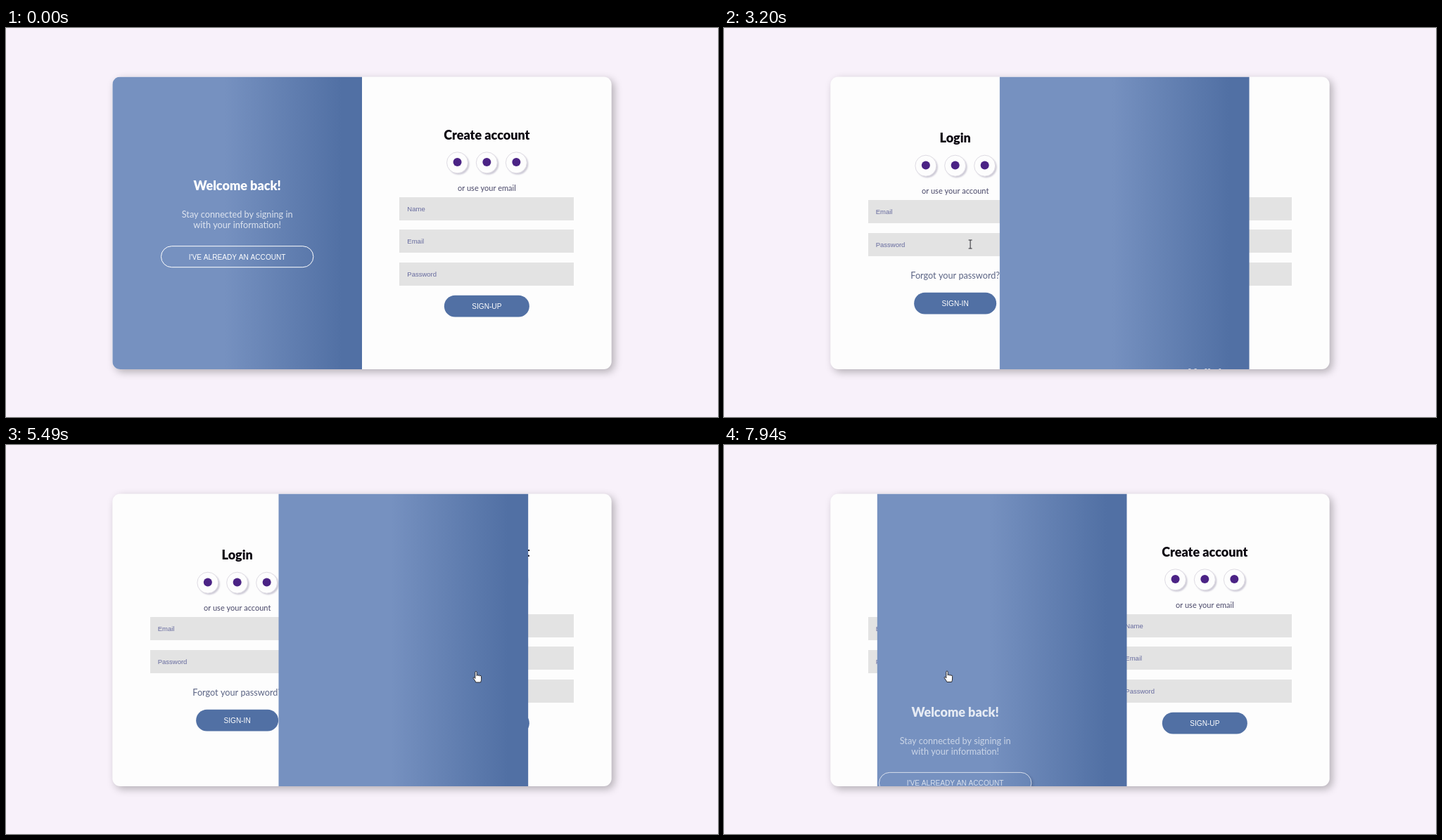
Write an HTML page with a canvas that moves like this. It is 1012 px wide and 554 px high and loops after 8 s.

```html
<!DOCTYPE html>
<html lang="en">
<head>
<meta charset="utf-8">
<title>Sliding sign-in card</title>
<style>
  html, body { margin: 0; width: 100%; height: 100%; overflow: hidden; background: #f8f1fa; }
  canvas { display: block; }
</style>
</head>
<body>
<canvas id="stage" width="1012" height="554"></canvas>
<script>
const ctx = document.getElementById('stage').getContext('2d');
const LOOP = 8000;
const CARD = { x: 151.3, y: 69.6, w: 709.4, h: 416.4, r: 11 };
const HALF = CARD.w / 2;
const LEFT = CARD.x + HALF / 2, RIGHT = LEFT + HALF;
const WHITE = '#fdfdfd', BLUE = '#5170a4', LIGHT = '#7691c0';
const HUMAN = 'Lato, "Open Sans", sans-serif';
const ARIAL = '"Liberation Sans", Arial, sans-serif';
const TITLE = `900 18px ${HUMAN}`, BODY = `12.7px ${HUMAN}`, SMALL = `11px ${HUMAN}`;
const BUTTON = `10.1px ${ARIAL}`, FIELD = `9.5px ${ARIAL}`;

const clamp = v => Math.min(1, Math.max(0, v));

// cubic-bezier(.25, .1, .25, 1)
function ease(x) {
  if (x <= 0 || x >= 1) return clamp(x);
  const curve = (a, b, s) => 3 * (1 - s) * (1 - s) * s * a + 3 * (1 - s) * s * s * b + s * s * s;
  let lo = 0, hi = 1;
  for (let i = 0; i < 24; i++) {
    const mid = (lo + hi) / 2;
    if (curve(.25, .25, mid) < x) lo = mid; else hi = mid;
  }
  return curve(.1, 1, lo);
}

// 0: panel on the left, 1: panel on the right
const slide = t => ease((t - 2804) / 1000) - ease((t - 5274) / 1000) + ease((t - 7790) / 1000);

const hover = (t, from, to) => clamp((t - from) / 400) * (1 - clamp((t - to) / 400));

function box(x, y, w, h, r) {
  ctx.beginPath();
  ctx.roundRect(x, y, w, h, r);
}

function text(str, x, y, font, color, align = 'center') {
  ctx.font = font;
  ctx.fillStyle = color;
  ctx.textAlign = align;
  ctx.fillText(str, x, y);
}

function shadow(color, offset, blur) {
  ctx.shadowColor = color;
  ctx.shadowOffsetX = ctx.shadowOffsetY = offset;
  ctx.shadowBlur = blur;
}

function badge(x, y) {
  ctx.save();
  shadow('rgba(60,45,95,.24)', 2, 2);
  ctx.fillStyle = WHITE;
  ctx.beginPath();
  ctx.arc(x, y, 15, 0, 7);
  ctx.fill();
  ctx.restore();
  ctx.strokeStyle = '#dedbe3';
  ctx.lineWidth = 1;
  ctx.stroke();
  ctx.fillStyle = '#4b2385';
  ctx.beginPath();
  ctx.arc(x, y - .8, 6, 0, 7);
  ctx.fill();
}

function form({ cx, top, title, hint, fields, link, action, width, actionY }) {
  text(title, cx, top, TITLE, '#0b0710');
  for (const dx of [-41.8, 0, 42]) badge(cx + dx, top + 32.8);
  text(hint, cx, top + 72.8, SMALL, '#484768');
  fields.forEach((name, i) => {
    const y = Math.round(top + 81.6 + i * 46.6);
    ctx.fillStyle = '#e3e3e3';
    ctx.fillRect(Math.round(cx - 124), y, 248, 33);
    text(name, cx - 113, y + 19.8, FIELD, '#666a9e', 'left');
  });
  if (link) text(link, cx, 357, BODY, '#5b6484');
  ctx.fillStyle = BLUE;
  box(cx - width / 2, actionY, width, 30.8, 15.4);
  ctx.fill();
  text(action, cx, actionY + 19, BUTTON, '#fff');
}

function ghostButton(label, cx, width, h) {
  const x = cx - width / 2, y = h > 0 ? 310.2 : 310.7;
  if (h > 0) {
    ctx.save();
    ctx.beginPath();
    ctx.rect(0, -900, 1012, 2400);
    ctx.roundRect(x, y, width, 30, 15);
    ctx.clip('evenodd');
    shadow(`rgba(20,30,60,${.4 * h})`, 2, 4);
    ctx.fillStyle = LIGHT;
    box(x, y, width, 30, 15);
    ctx.fill();
    ctx.restore();
  }
  ctx.save();
  ctx.globalAlpha *= 1 - .12 * h;
  ctx.strokeStyle = '#fff';
  ctx.lineWidth = 1;
  box(x, y, width, 30, 15);
  ctx.stroke();
  text(label, cx, y + 18.8, BUTTON, '#fff');
  ctx.restore();
}

function message({ cx, title, lines, label, width }, away, h) {
  if (away > .5) return;
  ctx.save();
  ctx.globalAlpha = 1 - away;
  ctx.translate(0, away * CARD.h * 2);
  text(title, cx, 230.8, TITLE, '#fff');
  lines.forEach((line, i) => text(line, cx, 269.6 + i * 15.4, BODY, 'rgba(255,255,255,.76)'));
  ghostButton(label, cx, width, h);
  ctx.restore();
}

const signUp = {
  cx: RIGHT, top: 159, title: 'Create account', hint: 'or use your email',
  fields: ['Name', 'Email', 'Password'], action: 'SIGN-UP', width: 121, actionY: 380.8
};
const signIn = {
  cx: LEFT, top: 163.4, title: 'Login', hint: 'or use your account',
  fields: ['Email', 'Password'], link: 'Forgot your password?',
  action: 'SIGN-IN', width: 117, actionY: 376.8
};
const welcome = {
  cx: LEFT, title: 'Welcome back!', label: "I'VE ALREADY AN ACCOUNT", width: 216.4,
  lines: ['Stay connected by signing in', 'with your information!']
};
const hello = {
  cx: RIGHT, title: 'Hello!', label: 'CREATE ACCOUNT', width: 173,
  lines: ['Insert some information and start', 'your journey with us!']
};

const cursors = {
  arrow: new Path2D('M0 0V13l3-2.8 2 4.4 2-.9-2-4.2H9.2Z'),
  hand: new Path2D('M-1.2 10V1.2a1.2 1.2 0 0 1 2.4 0V6a1.1 1.1 0 0 1 2.2 .3a1.1 1.1 0 0 1 2.2 .4' +
    'a1 1 0 0 1 2 .6V11Q7.6 13 6.6 15.5H-.2Q-1.5 12.5-3.8 9.8Q-4.2 8.2-2.6 8.4Z'),
  beam: new Path2D('M-2.5-6H2.5M0-6V6M-2.5 6H2.5')
};

// time, x, y and the pointer shown from then on
const track = [
  [520, 940, 551, 'arrow'], [1300, 530, 386, 'arrow'], [1500, 445, 358, 'arrow'],
  [1720, 388, 340, 'hand'], [1910, 357, 329, 'hand'], [2050, 357, 320, 'hand'],
  [2590, 357, 320, 'hand'], [2600, 352, 321, 'hand'], [2800, 352, 321, 'hand'],
  [3130, 350, 310, 'beam'], [3200, 350, 308, 'beam'], [3640, 385, 310, 'beam'],
  [3770, 420, 312, 'beam'], [3865, 452, 314, 'arrow'], [4340, 600, 321, 'hand'],
  [4660, 662, 324, 'hand'], [4800, 668, 322.5, 'hand'], [6050, 668, 322.5, 'arrow'],
  [6740, 430, 316, 'hand'], [6930, 361, 312, 'hand'], [7280, 317, 322, 'hand'],
  [LOOP, 317, 322, 'hand']
];

function pointer(t) {
  const i = track.findIndex(key => key[0] > t);
  if (i < 1) return;
  const [t0, x0, y0, kind] = track[i - 1], [t1, x1, y1] = track[i];
  const k = (t - t0) / (t1 - t0);
  ctx.save();
  ctx.translate(x0 + (x1 - x0) * k, y0 + (y1 - y0) * k);
  ctx.lineWidth = 1;
  ctx.lineJoin = 'round';
  ctx.strokeStyle = '#2a2a30';
  ctx.fillStyle = '#fff';
  if (kind !== 'beam') ctx.fill(cursors[kind]);
  ctx.stroke(cursors[kind]);
  ctx.restore();
}

function draw(t) {
  const p = slide(t), x = CARD.x + p * HALF;
  ctx.fillStyle = '#f8f1fa';
  ctx.fillRect(0, 0, 1012, 554);

  ctx.save();
  shadow('rgba(0,0,0,.28)', 4, 12);
  ctx.fillStyle = WHITE;
  box(CARD.x, CARD.y, CARD.w, CARD.h, CARD.r);
  ctx.fill();
  ctx.restore();

  ctx.save();
  ctx.clip();
  form(signIn);
  form(signUp);

  const shade = ctx.createLinearGradient(x, 0, x + HALF, 0);
  shade.addColorStop(.45, LIGHT);
  shade.addColorStop(.92, BLUE);
  ctx.fillStyle = shade;
  ctx.beginPath();
  ctx.rect(x, CARD.y, HALF, CARD.h);
  ctx.fill();
  ctx.clip();
  message(welcome, p, hover(t, 1720, 2850) + hover(t, 6860, 7900));
  message(hello, 1 - p, hover(t, 4380, 5350));
  ctx.restore();

  pointer(t);
}

function tick() {
  draw(performance.now() % LOOP);
  requestAnimationFrame(tick);
}
tick();
</script>
</body>
</html>
```
